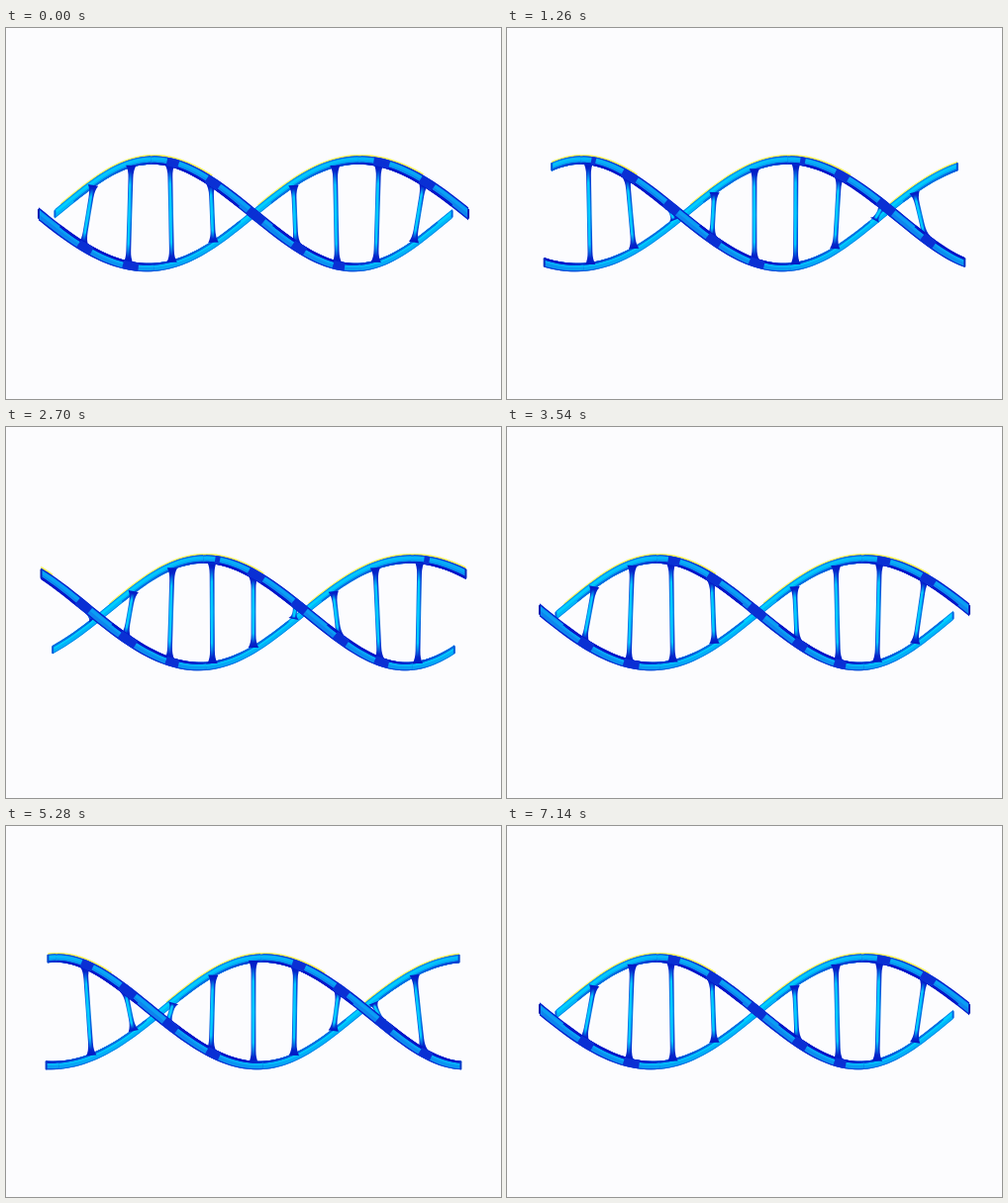
Recreate the animation shown at these times as an HTML page with a canvas. Size 500 by 375 pixels, loop 7.2 s.

```html
<!DOCTYPE html>
<html lang="en">
<head>
<meta charset="utf-8">
<title>Double helix</title>
<style>
  html, body { margin: 0; width: 100%; height: 100%; overflow: hidden; background: #fcfcfe; }
  canvas { display: block; width: 500px; height: 375px; }
</style>
</head>
<body>
<canvas id="stage" width="500" height="375"></canvas>
<script>
const ctx = document.getElementById('stage').getContext('2d');
const LOOP = 7200, STEP = 60;
const CX = 250, CY = 187.8;
const RADIUS = 54.2, DEPTH = 57, CAMERA = 1450;
const GAP = 41.7;            // distance between rungs
const HALF = GAP * 5;        // half length of the helix
const TURN = Math.PI / HALF;
const SAMPLES = 180, OVERRUN = 8;

const mix = (a, b, k) => a + (b - a) * k;
const blend = (a, b, k) => `rgb(${a.map((v, i) => Math.round(mix(v, b[i], k)))})`;
const clamp = k => Math.max(0, Math.min(1, k));

// Point on a strand at distance u from the centre
function project(u, spin) {
  const angle = u * TURN + spin;
  const depth = Math.cos(angle);
  const scale = CAMERA / (CAMERA - DEPTH * depth);
  return {
    u, depth,
    rise: -Math.sin(angle),
    x: CX + u * scale,
    y: CY + RADIUS * Math.sin(angle) * scale,
    width: 8.4 + 1.5 * depth
  };
}

// The samples run past both ends, which are cut off vertically when drawn
function strand(spin) {
  const pts = [], reach = HALF + OVERRUN;
  for (let i = 0; i <= SAMPLES; i++) pts.push(project(mix(-reach, reach, i / SAMPLES), spin));
  pts.forEach((p, i) => {
    const a = pts[Math.max(0, i - 1)], b = pts[Math.min(SAMPLES, i + 1)];
    const len = Math.hypot(b.x - a.x, b.y - a.y);
    p.nx = -(b.y - a.y) / len;
    p.ny = (b.x - a.x) / len;
  });
  return { pts, ends: [project(-HALF, spin), project(HALF, spin)] };
}

// Strip of the ribbon between two offsets, -0.5 (top) to 0.5 (bottom)
function strip(a, b, from, to, color) {
  const at = (p, k) => [p.x + p.nx * p.width * k, p.y + p.ny * p.width * k];
  ctx.fillStyle = color;
  ctx.beginPath();
  ctx.moveTo(...at(a, from));
  ctx.lineTo(...at(b, from));
  ctx.lineTo(...at(b, to));
  ctx.lineTo(...at(a, to));
  ctx.fill();
}

function nearRung(u) {
  const n = Math.round(u / GAP);
  return Math.abs(n) <= 4 && Math.abs(u - n * GAP) < 5.5;
}

function drawStrand({ pts, ends }, front) {
  const pass = paint => {
    for (let i = 0; i < SAMPLES; i++) {
      const a = pts[i];
      if (a.depth >= 0 === front) paint(a, pts[Math.min(SAMPLES, i + 2)]);
    }
  };
  ctx.save();
  ctx.beginPath();
  ctx.rect(ends[0].x, 0, ends[1].x - ends[0].x, 375);
  ctx.clip();

  // Pale rim above the upper half
  pass((a, b) => {
    if (a.rise > 0.1 && a.depth < 0.75) strip(a, b, -0.66, -0.4, '#fff45c');
  });
  pass((a, b) => strip(a, b, -0.5, 0.5,
    blend([0, 140, 235], [6, 34, 205], clamp(0.5 + a.depth * 0.6))));
  pass((a, b) => strip(a, b, -0.36, 0.36,
    blend([0, 184, 248], [14, 132, 238], (a.depth + 1) / 2)));
  pass((a, b) => strip(a, b, -0.3, 0,
    blend([0, 208, 255], [10, 158, 244], (a.depth + 1) / 2)));
  // Shaded side facing the axis
  pass((a, b) => {
    const side = Math.sign(a.rise);
    if (Math.abs(a.rise) > 0.25) {
      strip(a, b, side * 0.26, side * 0.5, blend([0, 110, 225], [4, 20, 200], clamp(0.7 + a.depth)));
    }
  });
  pass((a, b) => {
    if (a.depth > 0.2 && nearRung(a.u)) strip(a, b, -0.46, 0.46, '#0a30d4');
  });
  ctx.restore();

  for (const p of ends) {
    if (p.depth >= 0 !== front) continue;
    const k = p.width * 0.42;
    ctx.strokeStyle = blend([0, 100, 225], [6, 30, 180], (p.depth + 1) / 2);
    ctx.lineWidth = 2;
    ctx.lineCap = 'round';
    ctx.beginPath();
    ctx.moveTo(p.x, p.y - k);
    ctx.lineTo(p.x, p.y + k);
    ctx.stroke();
  }
}

// Waisted bar along the local x axis
function waist(len, end, mid, flare) {
  ctx.beginPath();
  ctx.moveTo(0, -end);
  ctx.quadraticCurveTo(flare * 0.35, -mid, flare, -mid);
  ctx.lineTo(len - flare, -mid);
  ctx.quadraticCurveTo(len - flare * 0.35, -mid, len, -end);
  ctx.lineTo(len, end);
  ctx.quadraticCurveTo(len - flare * 0.35, mid, len - flare, mid);
  ctx.lineTo(flare, mid);
  ctx.quadraticCurveTo(flare * 0.35, mid, 0, end);
  ctx.closePath();
  ctx.fill();
}

function drawRung(n, spin) {
  const u = n * GAP;
  let a = project(u, spin), b = project(u, spin + Math.PI);
  if (a.y > b.y) [a, b] = [b, a];
  const inset = 2;
  const len = Math.hypot(b.x - a.x, b.y - a.y) - inset * 2;
  if (len < 6) return;
  const flare = Math.min(13, len * 0.38);
  ctx.save();
  ctx.translate(a.x, a.y);
  ctx.rotate(Math.atan2(b.y - a.y, b.x - a.x));
  ctx.translate(inset, 0);

  const body = ctx.createLinearGradient(0, 0, len, 0);
  body.addColorStop(0, '#0418c4');
  body.addColorStop(0.22, '#0648d8');
  body.addColorStop(0.5, '#0680e6');
  body.addColorStop(0.78, '#0648d8');
  body.addColorStop(1, '#0418c4');
  ctx.fillStyle = body;
  waist(len, 5.2, 2.4, flare);

  const core = ctx.createLinearGradient(0, 0, len, 0);
  core.addColorStop(0.06, 'rgba(0,200,255,0)');
  core.addColorStop(0.2, 'rgb(0,204,255)');
  core.addColorStop(0.8, 'rgb(0,204,255)');
  core.addColorStop(0.94, 'rgba(0,200,255,0)');
  ctx.fillStyle = core;
  ctx.fillRect(0, -0.9, len, 2.5);
  ctx.restore();
}

function draw(time) {
  const spin = time / LOOP * 2 * Math.PI;
  const strands = [strand(spin), strand(spin + Math.PI)];
  ctx.fillStyle = '#fcfcfe';
  ctx.fillRect(0, 0, 500, 375);
  strands.forEach(s => drawStrand(s, false));
  for (let n = -4; n <= 4; n++) drawRung(n, spin);
  strands.forEach(s => drawStrand(s, true));
}

const start = performance.now();
function tick() {
  const time = (performance.now() - start) % LOOP;
  draw(Math.floor(time / STEP) * STEP);
  requestAnimationFrame(tick);
}
tick();
</script>
</body>
</html>
```
